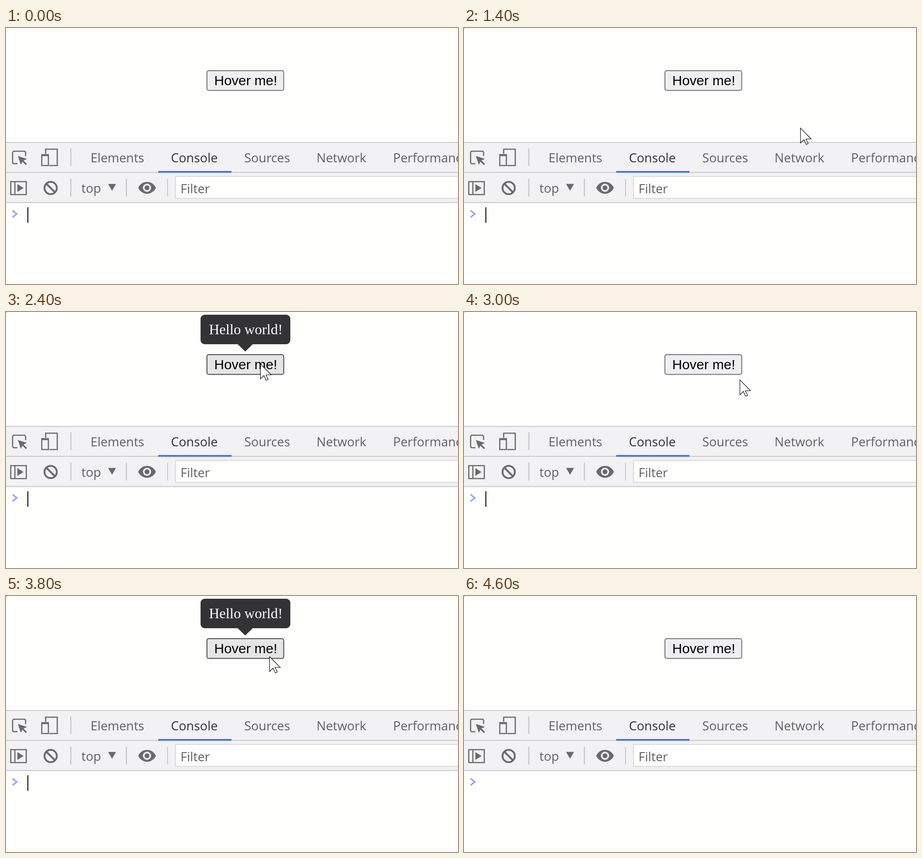
These frames come from a looping animation (992x564 px, 4800 ms). An HTML page:

```html
<!DOCTYPE html>
<html lang="en">
<head>
<meta charset="utf-8">
<title>Hover tooltip</title>
<style>
  html, body { margin: 0; width: 100%; height: 100%; overflow: hidden; background: #fefefd; }
  svg { display: block; width: 992px; height: 564px; }
  .ui { font: 27.4px "Open Sans", "Noto Sans", sans-serif; fill: #606064; }
  .rule { fill: #c8c8cc; }
  .line { fill: none; stroke: #6a6a6e; stroke-width: 2.6; }
  .solid { fill: #6a6a6e; }
</style>
</head>
<body>
<svg viewBox="0 0 992 564">
  <rect id="dot" width="1" height="1"/>

  <rect id="button" x="441" y="94" width="168.500" height="43.500" rx="4" stroke-width="2"/>
  <text x="457" y="126" font-family="Liberation Sans, Arial, sans-serif" font-size="30">Hover me!</text>

  <g id="tooltip">
    <path fill="#333335" d="M436 6H615a9 9 0 0 1 9 9V62a9 9 0 0 1-9 9H541.500L525 87 508.500 71H436a9 9 0 0 1-9-9V15a9 9 0 0 1 9-9Z"/>
    <text x="445.500" y="49" fill="#fff" font-family="Liberation Serif, Times New Roman, serif" font-size="31.5">Hello world!</text>
  </g>

  <!-- panel bars -->
  <rect y="251" width="992" height="134" fill="#f2f2f5"/>
  <g class="rule">
    <rect y="251" width="992" height="2"/>
    <rect y="317" width="992" height="2"/>
    <rect y="383.500" width="992" height="2"/>
    <rect x="141" y="265" width="2.500" height="39"/>
    <rect x="141" y="332" width="2.500" height="39"/>
    <rect x="263" y="332" width="2.500" height="39"/>
    <rect x="353.500" y="332" width="2" height="39"/>
  </g>
  <rect x="334" y="315" width="161" height="4" fill="#4b76df"/>
  <rect x="372" y="327" width="640" height="48.500" fill="#fefefd" stroke="#dedee2" stroke-width="2.500"/>

  <!-- tab bar icons -->
  <path class="line" d="M43 282V274.500a3 3 0 0 0-3-3H17.500a3 3 0 0 0-3 3V296a3 3 0 0 0 3 3H25"/>
  <path class="solid" d="M26 282L46 288.500 38.500 292 46 299.500 43.500 302 36 294.500 32.500 301.500Z"/>
  <path class="line" d="M87 277V267H112.500V303H95"/>
  <path class="line" d="M78.500 279H93V303H78.500ZM78.500 281H93"/>

  <!-- tool bar icons -->
  <path class="line" d="M10.500 338.500H44.500V367H10.500ZM19.500 338V367"/>
  <path class="solid" d="M25 344L38.500 352.500 25 361Z"/>
  <circle class="line" cx="98" cy="352.500" r="13.500" style="stroke-width:4"/>
  <path class="line" d="M88.500 343L107.500 362" style="stroke-width:4"/>
  <path class="solid" d="M224 343.500H241.500L232.700 358.500Z"/>
  <path class="solid" d="M290 352C298 334.500 321 334.500 329 352 321 369.500 298 369.500 290 352Z"/>
  <circle cx="309.500" cy="352" r="7.200" fill="none" stroke="#f2f2f5" stroke-width="3.600"/>

  <g class="ui">
    <text x="185.500" y="296">Elements</text>
    <text x="362" y="296" fill="#303034">Console</text>
    <text x="523" y="296">Sources</text>
    <text x="681.500" y="296">Network</text>
    <text x="849.500" y="296">Performance</text>
    <text x="165.500" y="363">top</text>
    <text x="383" y="363.500">Filter</text>
  </g>

  <path d="M14.500 402L23.500 409.500 14.500 417" fill="none" stroke="#92a6f2" stroke-width="3.400"/>
  <rect id="caret" x="47" y="395" width="2" height="34"/>
  <path id="cursor" d="M.5.5V33.500L8 26 13 36.500 17.500 34.500 12.500 24.500H24Z" fill="#fff" stroke="#000" stroke-width="1.100"/>
</svg>
<script>
const STEP = 200, LOOP = 4800, FIRST_MOVE = 4;
const get = id => document.getElementById(id);
const [dot, button, tooltip, caret, cursor] =
  ["dot", "button", "tooltip", "caret", "cursor"].map(get);

// Pointer tip at each step, starting at FIRST_MOVE
const path = [
  [856, 518], [788, 461], [692, 367], [738, 220], [609, 158], [561, 117],
  [558, 115], [558, 114], [558, 114], [609, 164], [632, 183], [605, 149],
  [575, 122], [560, 109], [571, 110], [578, 133], [617, 195], [629, 346]
];
const caretOn = [[0, 800], [1400, 2000], [2400, 3200], [3600, 4400]];
const hovers = [[1800, 2600], [3200, 4000]];
// Tooltip opacity while it is between hidden and shown
const fades = { 1800: 0.67, 2600: 0.5, 3200: 0.5, 4000: 0.5 };

const within = (spans, t) => spans.some(([from, to]) => t >= from && t < to);
const show = (el, on) => el.setAttribute("visibility", on ? "visible" : "hidden");

function draw(now) {
  const step = Math.floor(now % LOOP / STEP), t = step * STEP;
  const hover = within(hovers, t), tip = path[step - FIRST_MOVE];

  show(dot, t >= 400);
  show(caret, within(caretOn, t));
  show(cursor, tip);
  if (tip) cursor.setAttribute("transform", `translate(${tip})`);
  button.setAttribute("fill", hover ? "#e5e5e5" : "#efeff1");
  button.setAttribute("stroke", hover ? "#4c4c4e" : "#747476");
  tooltip.setAttribute("opacity", fades[t] ?? +hover);
  requestAnimationFrame(draw);
}
draw(performance.now());
</script>
</body>
</html>
```
